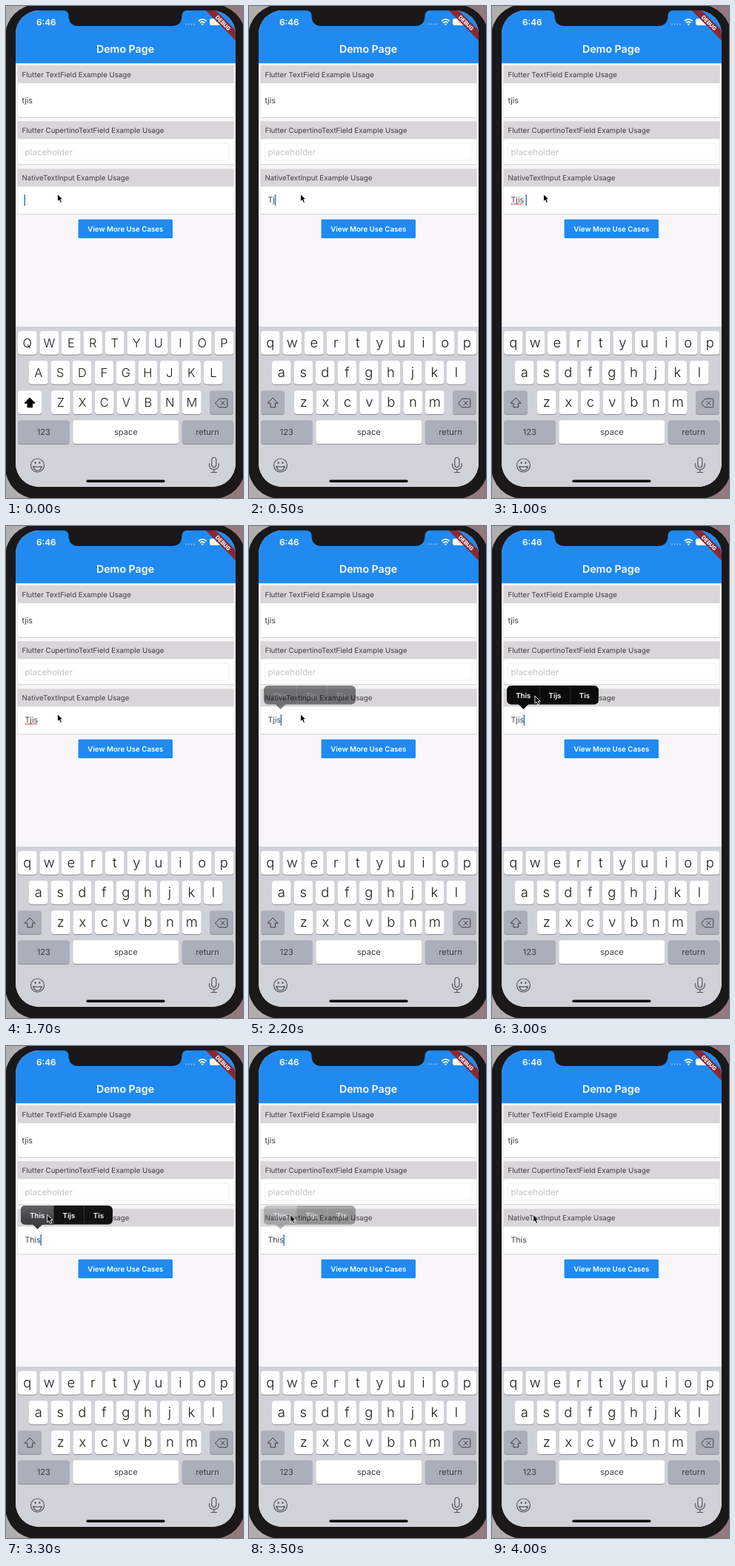
An HTML page for the animation above (4.3 s loop, 320 by 663 pixels).

```html
<!DOCTYPE html>
<html lang="en">
<head>
<meta charset="utf-8">
<title>Demo Page</title>
<style>
  html, body { margin: 0; width: 100%; height: 100%; overflow: hidden; background: #1a1819; }
  svg { display: block; width: 100vw; height: 100vh; }
  text { font: 9.7px Inter, "Open Sans", sans-serif; fill: #3f3d41; white-space: pre; text-rendering: geometricPrecision; }
  .bold { font-weight: 600; fill: #fff; }
  .mid { text-anchor: middle; }
  .key { fill: #fff; }
  .dark { fill: #abafba; }
  .icon { fill: none; stroke: #3c3d42; stroke-width: 1; stroke-linejoin: round; stroke-linecap: round; }
  #letters text { font-size: 16.4px; font-weight: 350; fill: #1c1c1e; }
  #letters.lower text { font-size: 18.4px; font-weight: 300; }
  .label { font-size: 11.1px; }
</style>
</head>
<body>
<svg viewBox="0 0 320 663" preserveAspectRatio="none">
  <defs>
    <clipPath id="screen"><rect x="13" y="6" width="297" height="642" rx="32"/></clipPath>
    <linearGradient id="pressed" x1="0" y1="0" x2="0" y2="1">
      <stop offset="0" stop-color="#5b5b5d"/><stop offset="1" stop-color="#363638"/>
    </linearGradient>
  </defs>

  <!-- phone body -->
  <rect width="160" height="663" fill="#b1afae"/>
  <rect x="160" width="160" height="663" fill="#94797d"/>
  <rect x="-1" y="-2" width="324" height="666" rx="43" fill="#1a1819"/>

  <g clip-path="url(#screen)">
    <rect width="320" height="663" fill="#f8f6f9"/>
    <rect width="320" height="77" fill="#208af1"/>
    <rect y="77" width="320" height="1" fill="#d3dbe6"/>

    <!-- status bar -->
    <text class="bold" x="41" y="26" style="font-size:11.7px">6:46</text>
    <g fill="#8fc3f6"><circle cx="243" cy="24.5" r=".9"/><circle cx="246.6" cy="24.5" r=".9"/><circle cx="250.2" cy="24.5" r=".9"/><circle cx="253.8" cy="24.5" r=".9"/></g>
    <g fill="none" stroke="#fff" stroke-width="1.8">
      <path d="M260 20.2Q265.3 15.6 270.6 20.2M262.2 22.6Q265.3 20 268.4 22.6"/>
      <circle cx="265.3" cy="24.8" r=".4"/>
    </g>
    <rect x="275" y="17" width="17.5" height="9" rx="2.4" fill="#fff"/>
    <g transform="translate(310 6) rotate(45)">
      <rect x="-40" y="19" width="80" height="9.6" fill="#862a36"/>
      <text class="bold mid" x="0" y="26.5" style="font-size:7.3px;font-weight:800">DEBUG</text>
    </g>
    <text class="bold mid" x="161" y="62.5" style="font-size:14.2px">Demo Page</text>

    <g id="cards"></g>
    <text x="21.5" y="131" style="font-size:10.8px">tjis</text>
    <rect x="21.5" y="185" width="280" height="23" rx="4" fill="#fff" stroke="#f0f0f1"/>
    <text x="25.5" y="200.8" style="font-size:11.6px;fill:#c3c3c6">placeholder</text>

    <rect x="97" y="287" width="128.5" height="26.5" rx="2" fill="#208af1" stroke="#fff"/>
    <text class="bold mid" x="161.3" y="303.8">View More Use Cases</text>

    <!-- native input -->
    <text id="entry" x="25.5" y="265.2" style="font-size:10.6px"></text>
    <path id="spelling" d="M26 266.8H42.5" stroke="#e0333c" stroke-width="1.6" stroke-dasharray="1.8 .9"/>
    <rect id="caret" y="254" width="1.5" height="15" fill="#2b7bdc"/>

    <!-- keyboard -->
    <rect y="432" width="320" height="231" fill="#d0d2d9"/>
    <g id="keys"></g>
    <g id="letters"></g>
    <path id="shift" class="icon" d="M32.3 528.3L39.2 535.2H35.6V540.8H29V535.2H25.4Z"/>
    <path class="icon" d="M282.8 535L288 529.2H297.5Q298.8 529.2 298.8 530.5V539.5Q298.8 540.8 297.5 540.8H288ZM290 532.4L295.2 537.6M295.2 532.4L290 537.6"/>
    <text class="mid label" x="50.8" y="578">123</text>
    <text class="mid label" x="161.8" y="577.5">space</text>
    <text class="mid label" x="272" y="577.5">return</text>
    <g class="icon" style="stroke:#55575d;stroke-width:1.2">
      <circle cx="42.5" cy="619" r="9"/>
      <path d="M36.8 620.3Q42.5 622 48.2 620.3Q47.2 625.8 42.5 625.8T36.8 620.3Z"/>
      <path d="M39.6 615V616M45.4 615V616" stroke-width="2"/>
      <rect x="277.8" y="608.5" width="6" height="13" rx="3"/>
      <path d="M274.5 616.5V618.5Q274.5 624.5 280.8 624.5T287.1 618.5V616.5M280.8 624.5V628.5M277 628.5H284.6"/>
    </g>
    <rect x="108.5" y="638.6" width="106" height="3.3" rx="1.6" fill="#050505"/>

    <!-- suggestions -->
    <g id="menu">
      <rect x="20" y="215" width="124" height="25.5" rx="6" fill="#0b0b0c"/>
      <path id="pointer" d="M35.5 240H49.5L42.5 247Z"/>
      <path id="choice" d="M64.5 215V240.5H26Q20 240.5 20 234.5V221Q20 215 26 215Z" fill="url(#pressed)"/>
      <path d="M64.5 215V240.5M105.5 215V240.5" stroke="#303032" stroke-width=".8"/>
      <g id="options">
        <text class="bold mid" x="42.3" y="231.8">This</text>
        <text class="bold mid" x="85" y="231.8">Tijs</text>
        <text class="bold mid" x="125" y="231.8">Tis</text>
      </g>
    </g>
  </g>

  <path d="M76 5.5Q84.5 6 84.5 13Q84.5 27 98.5 27H223.5Q237.5 27 237.5 13Q237.5 6 246 5.5Z" fill="#1a1819"/>
  <path id="mouse" d="M0 0V10.2L2.3 8.2L4 12L6 11.1L4.3 7.4H7.4Z" fill="#000" stroke="#fff" stroke-width=".9"/>
</svg>
<script>
const LOOP = 4300, STEP = 100;
const $ = id => document.getElementById(id);

function add(parent, tag, attrs, content = "") {
  const node = document.createElementNS("http://www.w3.org/2000/svg", tag);
  for (const name in attrs) node.setAttribute(name, attrs[name]);
  node.textContent = content;
  return parent.appendChild(node);
}

function addCard(y, height, title) {
  const box = { x: 15.5, width: 292 };
  add($("cards"), "rect", { ...box, y: y + 1, height, rx: 2, fill: "#cfced2" });
  add($("cards"), "rect", { ...box, y, height, rx: 2, fill: "#fff" });
  add($("cards"), "rect", { ...box, y, height: 24, fill: "#d8d6d8" });
  add($("cards"), "text", { x: 21.5, y: y + 15.6 }, title);
}

function addKey(x, y, width, style = "key") {
  const box = { x, width, height: 31.7, rx: 4 };
  add($("keys"), "rect", { ...box, y: y + 1, fill: "#8d9097" });
  return add($("keys"), "rect", { ...box, y, class: style });
}

addCard(80, 70, "Flutter TextField Example Usage");
addCard(155.3, 58, "Flutter CupertinoTextField Example Usage");
addCard(219.4, 60.8, "NativeTextInput Example Usage");

const letters = [];
[["QWERTYUIOP", 16], ["ASDFGHJKL", 31], ["ZXCVBNM", 61]].forEach(([row, left], line) => {
  [...row].forEach((letter, i) => {
    const x = left + i * 29.5, y = 438 + line * 40.1;
    addKey(x, y, 25.6);
    const node = add($("letters"), "text", { x: x + 12.8, class: "mid" }, letter);
    letters.push({ letter, node, y });
  });
});
const shiftKey = addKey(16, 518.2, 32);
addKey(275, 518.2, 32, "dark");
addKey(16, 558.3, 70, "dark");
addKey(90.3, 558.3, 143);
addKey(237.8, 558.3, 69.5, "dark");

// Time, field text, caret position
const typing = [
  [0, "", 24.5], [200, "T", 32], [400, "Tj", 34.8], [600, "Tji", 37],
  [800, "Tjis", 42.8], [1000, "Tjis ", 45.5], [2000, "Tjis", 42.6], [3300, "This", 46.4]
];
const caretFade = [[0, 1], [1200, 1], [1700, 0], [1900, 0], [2000, 1], [2300, 1], [2600, 0], [2800, 0], [3000, 1], [3700, 1], [4000, 0]];
const menuFade = [[2100, 0], [2300, 1], [3200, 1], [3300, .96], [3600, 0]];
const mouseX = [[2300, 69.5], [2600, 64.5], [2700, 64.5], [3100, 55.7]];
const mouseY = [[2300, 253.3], [2600, 233.5], [2700, 233.5], [3100, 227.3]];

function track(points, t) {
  const next = points.findIndex(p => p[0] > t);
  if (next < 0) return points.at(-1)[1];
  if (next === 0) return points[0][1];
  const [t0, a] = points[next - 1], [t1, b] = points[next];
  return a + (b - a) * (t - t0) / (t1 - t0);
}

function setCase(upper) {
  $("letters").classList.toggle("lower", !upper);
  for (const { letter, node, y } of letters) {
    node.textContent = upper ? letter : letter.toLowerCase();
    node.setAttribute("y", y + (upper ? 22 : 21.5));
  }
  shiftKey.setAttribute("class", upper ? "key" : "dark");
  $("shift").style.fill = upper ? "#000" : "none";
  $("shift").style.stroke = upper ? "#000" : "";
}

function render(t) {
  const [, text, caretX] = typing.findLast(entry => entry[0] <= t);
  setCase(t < 200);
  $("entry").textContent = text;
  $("spelling").style.opacity = t >= 1000 && t < 2000 ? 1 : 0;
  $("caret").setAttribute("x", caretX);
  $("caret").style.opacity = track(caretFade, t);

  const pressed = t >= 3100;
  $("menu").style.opacity = track(menuFade, t);
  $("options").style.opacity = t < 2300 ? .25 : 1;
  $("choice").style.opacity = pressed ? 1 : 0;
  $("pointer").style.fill = pressed ? "#363638" : "#0b0b0c";
  $("mouse").setAttribute("transform", `translate(${track(mouseX, t)} ${track(mouseY, t)})`);
}

let last = -1;
function tick() {
  const t = Math.floor(performance.now() % LOOP / STEP) * STEP;
  if (t !== last) render(last = t);
  requestAnimationFrame(tick);
}
tick();
</script>
</body>
</html>
```
